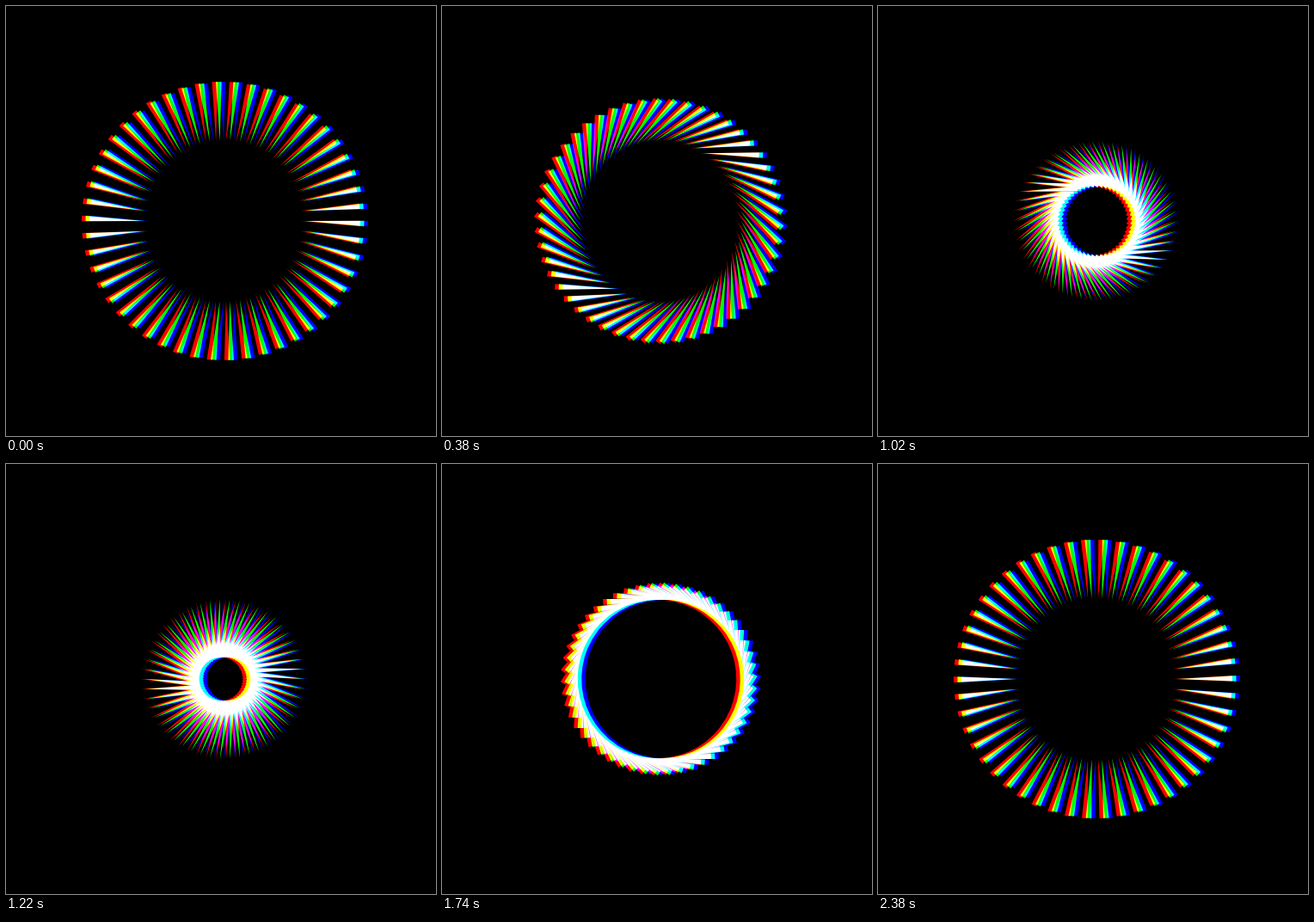
An HTML page with a canvas for the animation above (2.4 s loop, 500x500 px).

```html
<!DOCTYPE html>
<html lang="en">
<head>
<meta charset="utf-8">
<title>Turning spikes</title>
<style>
  html, body { margin: 0; width: 100%; height: 100%; overflow: hidden; background: #000; }
  canvas { display: block; }
</style>
</head>
<body>
<canvas id="stage" width="500" height="500"></canvas>
<script>
const SIZE = 500;
const LOOP = 2400;
const STEP = 20;
const SPIKES = 50;
const RING = 93.3;       // radius of the circle of spike tips
const LENGTH = 68.7;
const HALF_BASE = 3.3;
const START_TURN = 2.5 * Math.PI / 180;
const LAYERS = [['#f00', 250], ['#0f0', 254.5], ['#00f', 259]];

const ctx = document.getElementById('stage').getContext('2d');

// Each spike turns about its own tip, which stays on the ring.
function addSpike(cx, cy, around, turn) {
  const x = cx + RING * Math.cos(around);
  const y = cy + RING * Math.sin(around);
  const c = Math.cos(around + turn);
  const s = Math.sin(around + turn);
  ctx.moveTo(x, y);
  ctx.lineTo(x + LENGTH * c - HALF_BASE * s, y + LENGTH * s + HALF_BASE * c);
  ctx.lineTo(x + LENGTH * c + HALF_BASE * s, y + LENGTH * s - HALF_BASE * c);
  ctx.closePath();
}

function draw(time) {
  const step = Math.floor((time % LOOP) / STEP);
  const turn = START_TURN + 2 * Math.PI * step * STEP / LOOP;
  ctx.globalCompositeOperation = 'source-over';
  ctx.fillStyle = '#000';
  ctx.fillRect(0, 0, SIZE, SIZE);
  ctx.globalCompositeOperation = 'lighter';
  for (const [color, cx] of LAYERS) {
    ctx.fillStyle = color;
    ctx.beginPath();
    for (let i = 0; i < SPIKES; i++) addSpike(cx, SIZE / 2, 2 * Math.PI * i / SPIKES, turn);
    ctx.fill();
  }
}

const start = performance.now();
function tick() {
  draw(performance.now() - start);
  requestAnimationFrame(tick);
}
tick();
</script>
</body>
</html>
```
